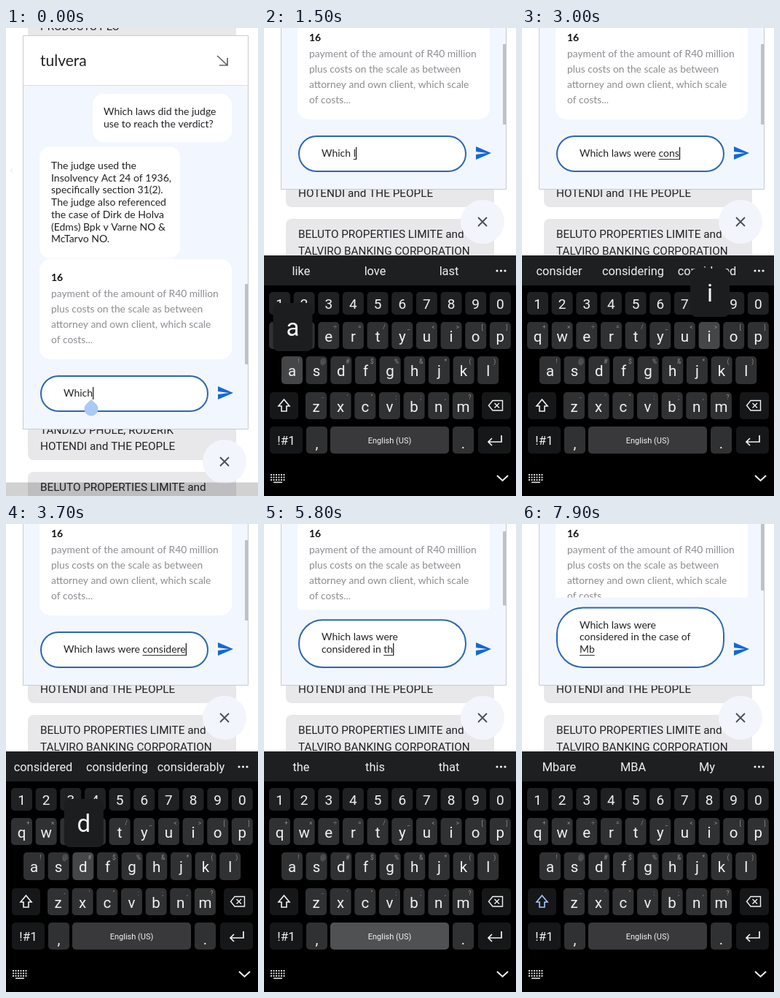
Recreate the animation shown at these times as an HTML page with a canvas. Size 346 by 640 pixels, loop 8000 ms.

```html
<!DOCTYPE html>
<html lang="en">
<head>
<meta charset="utf-8">
<title>Chat typing</title>
<style>
html, body { margin: 0; width: 100%; height: 100%; overflow: hidden; background: #fff; }
canvas { display: block; }
</style>
</head>
<body>
<canvas id="stage" width="346" height="640"></canvas>
<script>
const g = document.getElementById('stage').getContext('2d');
const LOOP = 8000, STEP = 100, LIFT = 328, SCROLL = 346, WRAP = 169;
const lato = size => `${size}px Lato, "Open Sans", sans-serif`;
const roboto = size => `${size}px Roboto, Inter, sans-serif`;
const CHAT = lato(14);

// [start, interval, keys]: "<" is backspace, "^" is shift
const presses = [
  [1000, 240, ' laws '], [2300, 45, 'were con'], [2820, 130, 'sidere'],
  [3700, 100, 'd in'], [4200, 100, 'e the'], [5000, 100, '<<<<<'],
  [5480, 76, ' the case of '], [7200, 250, '^Mb']
].flatMap(([start, gap, keys]) => [...keys].map((key, i) => ({ key, at: start + i * gap })));

// Letters before "~" are dimmed; "*" is the emoji
const suggestions = [
  [0, 'Whichever', 'Whish', 'Whither'], [1100, 'is', 'one', 'of'],
  [1340, 'like', 'love', 'last'], [1580, 'last', 'later', 'lady'],
  [1820, 'law', 'lawyer', 'lawn'], [2060, 'laws', 'lawyre', 'lawyers'],
  [2300, 'laws', 'l~awyre', 'law~yers*'], [2400, 'were', 'we', 'went'],
  [2600, 'contact', 'control', 'continue'], [2900, 'consider', 'considering', 'considered'],
  [3500, 'considered', 'considering', 'considerably'], [3900, 'in', 'by', 'as'],
  [4400, 'underground', 'in', '*'], [5500, 'the', 'this', 'that'],
  [5900, 'case', 'cases', 'same'], [6300, 'of', 'that', '*'],
  [7500, 'My', 'Me', 'More'], [7800, 'Mbare', 'MBA', 'My']
];

const keys = [];
function keyRow(labels, x, y, h, fill, hints = '') {
  [...labels].forEach((label, i) =>
    keys.push({ label, x: x + 33.65 * i, y, w: 29, h, fill, hint: hints[i] }));
}
keyRow('1234567890', 21.5, 361, 31, '#202123');
keyRow('qwertyuiop', 21.5, 402, 37, '#303133', '+×÷=/_<>[]');
keyRow('asdfghjkl', 38.5, 449, 38, '#303133', '!@#$%&*()');
keyRow('zxcvbnm', 71.5, 498, 37, '#303133', '-\'":;,?');
const special = (label, left, right, y, fill) =>
  keys.push({ label, x: (left + right) / 2, y, w: right - left, h: 37, fill, special: true });
special('^', 8, 47, 498, '#161718');
special('<', 299, 339, 498, '#161718');
special('!#1', 8, 53, 545, '#161718');
special(',', 58, 87, 545, '#303133');
special(' ', 91, 254, 545, '#39393b');
special('.', 259, 288, 545, '#303133');
special('\n', 294, 339, 545, '#161718');

function box(x, y, w, h, r, fill, stroke, line = 1) {
  g.beginPath();
  g.roundRect(x, y, w, h, r);
  paint(fill, stroke, line);
}
function disc(x, y, r, fill) {
  g.beginPath();
  g.arc(x, y, r, 0, 7);
  paint(fill);
}
function shape(d, fill, stroke, line = 1.5, x = 0, y = 0) {
  g.save();
  g.translate(x, y);
  const path = new Path2D(d);
  if (fill) { g.fillStyle = fill; g.fill(path); }
  if (stroke) { g.strokeStyle = stroke; g.lineWidth = line; g.stroke(path); }
  g.restore();
}
function paint(fill, stroke, line) {
  if (fill) { g.fillStyle = fill; g.fill(); }
  if (stroke) { g.strokeStyle = stroke; g.lineWidth = line; g.stroke(); }
}
function text(s, x, y, font, color, align = 'left') {
  g.font = font;
  g.fillStyle = color;
  g.textAlign = align;
  g.fillText(s, x, y);
}
const paragraph = (lines, x, y, gap, color, font = CHAT) =>
  lines.forEach((s, i) => text(s, x, y + gap * i, font, color));

function typed(t) {
  return presses.filter(p => p.at + 100 <= t).reduce((s, { key }) =>
    key === '<' ? s.slice(0, -1) : key === '^' ? s : s + key, 'Which');
}
function wrap(s) {
  g.font = CHAT;
  const lines = [''];
  for (const word of s.match(/\S+\s*/g)) {
    const last = lines.length - 1;
    if (g.measureText(lines[last] + word.trimEnd()).width > WRAP) lines.push(word);
    else lines[last] += word;
  }
  return lines;
}

function drawPage() {
  const label = (s, y) => text(s, 47, y, roboto(15.3), '#202124');
  box(30, -60, 286, 130, 8, '#e8e8ea');
  box(30, 480, 286, 111, 8, '#e8e8ea');
  box(30, 607, 286, 110, 8, '#e8e8ea');
  label('PRODUCTS PLC', 3);
  label('TANDIZO PHULE, RODERIK', 555);
  label('HOTENDI and THE PEOPLE', 577);
  label('BELUTO PROPERTIES LIMITE and', 633);
  label('TALVIRO BANKING CORPORATION', 656);
}

function drawPanel(t, last) {
  const lines = wrap(typed(t)), extra = lines.length - 1;
  const top = 475 - 16.7 * extra, height = 525 - top;
  box(23.5, 10.5, 309, 538, 0, '#f2f6fe', '#c9ccd1');
  box(24, 11, 308, 67, 0, '#fff');
  box(24, 78, 308, 1, 0, '#dcdfe4');
  text('tulvera', 47, 52, lato(21), '#202124');
  shape('M290 38L304 51M304 41V51H293', null, '#5f6368', 1.7);

  g.save();
  g.beginPath();
  g.rect(24, 79, 308, top - 13 - 79);
  g.clip();
  box(119, 90, 191, 66, 15, '#fff');
  paragraph(['Which laws did the judge', 'use to reach the verdict?'], 134, 119, 16.7, '#202124');
  box(46, 162, 193, 153, 15, '#fff');
  paragraph(['The judge used the', 'Insolvency Act 24 of 1936,', 'specifically section 31(2).',
    'The judge also referenced', 'the case of Dirk de Holva', '(Edms) Bpk v Varne NO &', 'McTarvo NO.'],
    62, 193, 16.7, '#202124');
  box(46, 316, 264, 137, 15, '#fff');
  text('16', 62, 346, 'bold ' + CHAT, '#111');
  paragraph(['payment of the amount of R40 million', 'plus costs on the scale as between',
    'attorney and own client, which scale', 'of costs...'], 62, 368, 21, '#8b8d92', lato(13.8));
  g.restore();
  box(328, 350 - 12 * extra, 4.5, 110 - 8.5 * extra, 1, '#bfc1c4');

  box(48, top + 1, 229, height - 2, Math.min(height / 2 - 1, 36), '#fff', '#2a68b0', 2);
  const baseline = i => 504 - 16.7 * (extra - i);
  lines.forEach((s, i) => text(s, 79, baseline(i), CHAT, '#202124'));
  const line = lines[extra], end = 79 + g.measureText(line).width;
  const word = line.match(/\S+$/);
  if (t >= 1000 && word) {
    const w = g.measureText(word[0]).width;
    box(end - w, 507, w, 1, 0, '#333');
  }
  const idle = t - (last ? last.at : 0);
  const blink = idle > 300 && Math.floor((t + 400) / 500) % 2;
  if (!blink && t < 7900) box(end, 491, 1.2, 17, 0, '#111');
  if (t < 1000) shape('M0 -13L7 -6.5A9.5 9.5 0 1 1 -7 -6.5Z', '#a9caf6', null, 0, 117, 521);
  shape('M2 21L23 12L2 3V10L17 12L2 14Z', '#1468d4', null, 0, 289, 487);
}

function drawClose() {
  disc(300, 593, 30, '#f2f5fc');
  shape('M294 587L306 599M306 587L294 599', null, '#4a4d52', 1.8);
}

function drawEmoji(x, y) {
  disc(x, y, 8.5, '#f0c04c');
  disc(x - 3, y - 2, 1.3, '#4b3420');
  disc(x + 3.5, y - 2, 1.3, '#4b3420');
  shape('M-6 -5Q-3 -7 -1 -5M2 -6Q5 -7 6 -5M-1 3Q2 1 4 3', null, '#7a5020', 1, x, y);
  shape('M-7 3L-4 2L2 4L-1 6Q-1 10 -5 9Q-9 8 -7 3Z', '#dc9338', null, 0, x, y);
}

function drawSuggestions(t) {
  const [, ...words] = suggestions.findLast(s => s[0] <= t);
  words.forEach((word, i) => {
    const x = 51 + 101.5 * i;
    const [head, tail] = word.replace('*', '').split('~');
    g.font = roboto(16.4);
    const left = x - g.measureText(head + (tail || '')).width / 2;
    const headWidth = g.measureText(head).width;
    text(head, left, 338, roboto(16.4), tail ? '#77787a' : '#f1f1f1');
    if (tail) text(tail, left + headWidth, 338, roboto(16.4), '#f1f1f1');
    if (word.includes('*')) drawEmoji(x, 332);
  });
  [320, 325.5, 331].forEach(x => disc(x, 332, 1.6, '#f1f1f1'));
}

function drawKey(k, pressed, caps, t) {
  const lit = k.special ? '#505153' : '#454648';
  box(k.x - k.w / 2, k.y, k.w, k.h, 5, pressed ? lit : k.fill);
  const white = '#f2f2f2';
  if (!k.special) {
    const digit = k.h === 31;
    text(caps ? k.label.toUpperCase() : k.label, k.x, k.y + (digit ? 22.5 : 26.5), roboto(digit ? 19 : 20.5), white, 'center');
    if (k.hint) text(k.hint, k.x + 9, k.y + 10, roboto(8.5), '#8c8d8f', 'center');
  } else if (k.label === '^') {
    shape('M27.5 508L35 517H31V524H24V517H20Z', null, t >= 7200 ? '#a5c9ff' : white, 1.6);
  } else if (k.label === '<') {
    shape('M314 509.5H327.5V523H314L308.5 516.2ZM316.5 513L323 519.5M323 513L316.5 519.5', null, white, 1.4);
  } else if (k.label === '\n') {
    shape('M326 557V566H308M313 561L308 566L313 571', null, white, 1.7);
  } else if (k.label === ' ') {
    text('English (US)', k.x, 568, roboto(11), white, 'center');
  } else {
    const mark = k.label.length === 1;
    text(k.label, k.x, mark ? 575 : 570, roboto(mark ? 20 : 17), white, 'center');
  }
}

function drawKeyboard(t, last) {
  const pressed = last && t - last.at < 200 ? last.key : null;
  const caps = t >= 7200 && t < 7600;
  box(0, 311, 346, 329, 0, '#000');
  box(0, 311, 346, 41, 0, '#1e1f21');
  drawSuggestions(t);
  keys.forEach(k => drawKey(k, pressed && k.label === pressed.toLowerCase(), caps, t));

  for (let y = 0; y < 3; y++)
    for (let x = 0; x < 6; x++) box(9 + x * 3.5, 610 + y * 3.5, 2, 2, 0, '#dedede');
  box(13, 620.5, 12, 1.6, 0, '#dedede');
  shape('M320 612L327.5 619L335 612', null, '#f2f2f2', 2);

  const k = keys.find(k => !k.special && pressed && k.label === pressed.toLowerCase());
  if (k) {
    box(k.x - 26, k.y - 73, 54, 66, 8, '#1c1d1f');
    text(pressed, k.x + 1, k.y - 28, roboto(33), '#f5f5f5', 'center');
  }
}

function at(y, draw) {
  g.save();
  g.translate(0, y);
  draw();
  g.restore();
}

function frame(now) {
  const t = Math.floor(now % LOOP / STEP) * STEP;
  const last = presses.findLast(p => p.at <= t);
  const raised = t >= 300;
  const rise = 1 - (1 - Math.min(1, 0.02 + t / 400)) ** 3;
  box(0, 0, 346, 640, 0, '#fff');
  at(raised ? -SCROLL : 0, drawPage);
  at(raised ? -LIFT : 0, () => {
    shape('M9 192L6.5 195L9 198', null, '#e3e3e3', 1);
    drawPanel(t, last);
    drawClose();
  });
  at(330 * (1 - rise), () => {
    g.globalAlpha = Math.min(1, 0.1 + t / 250);
    drawKeyboard(t, last);
  });
  requestAnimationFrame(() => frame(performance.now() - start));
}
const start = performance.now();
frame(0);
</script>
</body>
</html>
```
